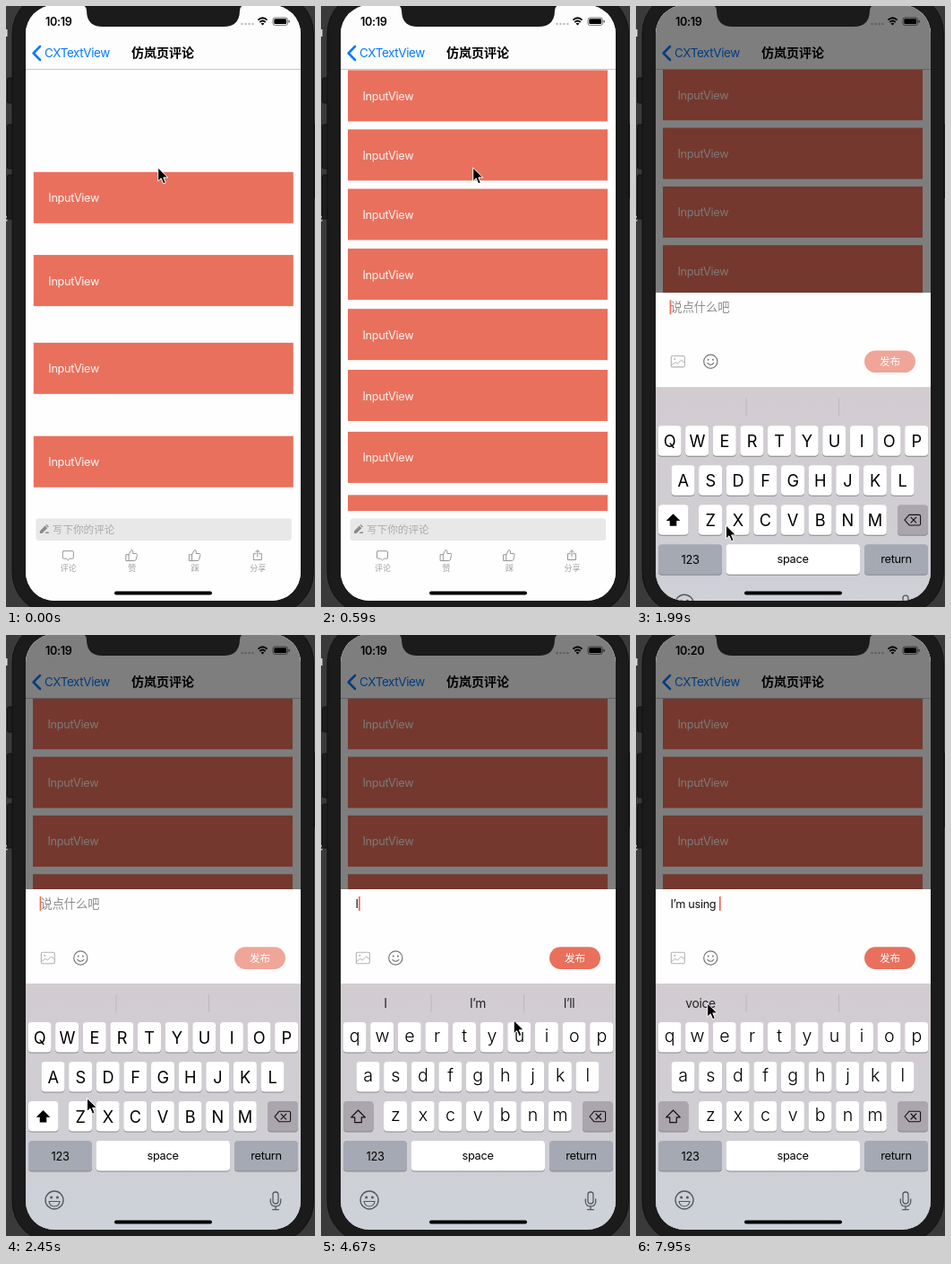
Animation of 345 by 669 pixels, one loop 8000 ms. Source, as an HTML page:

```html
<!DOCTYPE html>
<html lang="zh">
<head>
<meta charset="utf-8">
<style>
html, body { margin: 0; width: 100%; height: 100%; overflow: hidden; background: #3a3a3b; }
svg { display: block; }
text { font-family: Inter, "Noto Sans CJK SC", "Noto Sans CJK", sans-serif; letter-spacing: -.025em; white-space: pre; }
.cjk { letter-spacing: 0; }
.line { fill: none; stroke-linecap: round; stroke-linejoin: round; }
</style>
</head>
<body>
<svg id="stage" width="345" height="669" viewBox="0 0 345 669"></svg>
<script>
const CORAL = '#e9705c';
const ROWS = 8;

const rect = (x, y, w, h, fill, r = 0, extra = '') =>
  `<rect x="${x}" y="${y}" width="${w}" height="${h}" rx="${r}" fill="${fill}" ${extra}/>`;
const text = (x, y, size, fill, s, extra = '') =>
  `<text x="${x}" y="${y}" font-size="${size}" fill="${fill}" ${extra}>${s}</text>`;
const line = (d, stroke, width = 1, extra = '') =>
  `<path class="line" d="${d}" stroke="${stroke}" stroke-width="${width}" ${extra}/>`;
const at = (x, y, s) => `<g transform="translate(${x} ${y})">${s}</g>`;
const MID = 'text-anchor="middle"';
const CJK = 'class="cjk"';

function backdrop() {
  const sideKeys = [[80, 28], [132, 49], [188, 49]]
    .map(([y, h]) => rect(1.5, y, 9, h, '#1d1d1d', 2, 'stroke="#101010"')).join('');
  return rect(0, 0, 345, 669, '#3a3a3b') +
    rect(0, 26, 1.5, 8, '#ddd') + rect(0, 234, 1.5, 1.5, '#ccc') + rect(0, 238, 1.5, 1.5, '#ccc') +
    sideKeys + rect(340, 131, 5, 83, '#1d1d1d') +
    rect(7, -16, 336.5, 693, '#1b1b1b', 47, 'stroke="#111" stroke-width="1"');
}

function statusBar() {
  const dots = [264, 268, 272, 276]
    .map(x => `<circle cx="${x - .5}" cy="20" r="1.2" fill="#b9b9b9"/>`).join('');
  return text(44, 21.6, 12.6, '#000', '10:19', 'id="clock" font-weight="600"') + dots +
    line('M281.4 15.6Q286.5 11 291.6 15.6M283.3 18Q286.5 15.2 289.7 18', '#000', 1.9, 'style="stroke-linecap:butt"') +
    '<path d="M284.6 19.6Q286.5 18 288.4 19.6L286.5 21.6z"/>' +
    rect(298, 13, 16.5, 8.4, 'none', 2.4, 'stroke="#555" stroke-width=".8"') +
    rect(299.3, 14.3, 13.9, 5.8, '#000', 1.4) + rect(315.5, 15.8, 1.3, 2.8, '#555', .6);
}

function navBar() {
  return rect(22, -1, 307, 71.5, '#fdfdfd') + rect(22, 70, 307, .8, '#b9b9bb') + statusBar() +
    line('M38 45L30.6 52.5L38 60', '#007aff', 2.5) +
    text(43, 57.2, 13.4, '#007aff', 'CXTextView') +
    text(175, 57.4, 14, '#000', '仿岚页评论', `${CJK} ${MID} font-weight="600"`);
}

function bottomBar() {
  const thumb = 'M-6-.8h2.8v6.8h-2.8zM-3.2-.8L-.4-6q2.6 0 1.9 4h4q.9.5.5 2l-1.2 4.8q-.3 1.2-1.5 1.2h-6.5';
  const tabs = [
    [68.5, '评论', 'M-5-4.8h10q1 0 1 1v6.4q0 1-1 1h-3l-2 1.8-2-1.8h-3q-1 0-1-1v-6.4q0-1 1-1z'],
    [139.5, '赞', thumb], [210, '踩', thumb],
    [280, '分享', 'M-1.8-1.8h-2.7v6.8h9v-6.8h-2.7M0 1.5v-7M-2.2-3.5l2.2-2.2 2.2 2.2']
  ].map(([x, label, d]) => at(x, 611.5, line(d, '#969696')) +
    text(x + .5, 629, 9, '#a0a0a0', label, `${CJK} ${MID}`)).join('');
  return rect(20, 562, 312, 110, '#fefefe') + rect(32.5, 570.5, 285.5, 24.5, '#e8e8e8', 3) +
    '<path d="M37 587v-2.6l5.8-5.8 2.6 2.6-5.8 5.8zM43.5 577.9l.9-.9 2.6 2.6-.9.9zM42.5 587l1.5-1.5h3v1.5z" fill="#8b8b8b"/>' +
    text(51, 587, 11.6, '#aaa', '写下你的评论', CJK) + tabs;
}

function key(x, y, w, fill) {
  return rect(x, y + 1, w, 33.5, '#88868b', 4) + rect(x, y, w, 33.5, fill, 4);
}

function keyboard() {
  const rows = [['qwertyuiop', 37.5, 431], ['asdfghjkl', 52.5, 475], ['zxcvbnm', 83, 519]];
  let caps = '', upper = '', lower = '';
  for (const [letters, x0, y] of rows) {
    [...letters].forEach((c, i) => {
      const x = x0 + i * 30.63;
      caps += key(x - 13, y, 26, '#fff');
      upper += text(x, y + 23.6, 18.2, '#000', c.toUpperCase(), MID);
      lower += text(x, y + 21.6, 19.6, '#000', c, MID + ' font-weight="300"');
    });
  }
  const arrow = 'M41.5 529L49.3 536.8H45.3V542.6H37.7V536.8H33.7z';
  const dark = '#aba5ad', gray = '#a5a9b3';
  return rect(22, 388, 307, 420, 'url(#board)') +
    rect(122.6, 400, .9, 20, '#bbb5ba') + rect(226, 400, .9, 20, '#bbb5ba') +
    [72, 175, 277].map(x => text(x, 415, 13.8, '#222', '', `class="hint" ${MID}`)).join('') +
    caps + key(292, 519, 34, dark) +
    line('M300 536l5-5.8h11q1.6 0 1.6 1.6v8.4q0 1.6-1.6 1.6h-11zM307 533l5.8 6M312.8 533l-5.8 6', '#111', 1.1) +
    `<g id="upper">${upper}${key(25, 519, 33.5, '#fff')}<path d="${arrow}"/></g>` +
    `<g id="lower">${lower}${key(25, 519, 33.5, dark)}${line(arrow, '#111', 1.2)}</g>` +
    key(25, 563, 71, gray) + key(100.5, 563, 149.5, '#fff') + key(255, 563, 71, gray) +
    text(60.5, 585, 12.8, '#000', '123', MID) + text(175, 584, 12.8, '#000', 'space', MID) +
    text(290.5, 584, 12.8, '#000', 'return', MID) +
    at(54, 629, '<circle r="10" fill="none" stroke="#55595e" stroke-width="1.4"/>' +
      '<circle cx="-3.4" cy="-3" r="1.5" fill="#55595e"/><circle cx="3.4" cy="-3" r="1.5" fill="#55595e"/>' +
      line('M-6 1.5H6Q5 7 0 7T-6 1.5z', '#55595e', 1.2)) +
    at(301, 630, rect(-3, -10, 6, 13, 'none', 3, 'stroke="#55595e" stroke-width="1.3"') +
      line('M-5.7-2V1Q-5.2 6 0 6T5.7 1V-2M0 6V9.7M-3.3 9.7H3.3', '#55595e', 1.3));
}

function sheet() {
  return rect(22, 283, 307, 106, '#fefefe') +
    text(38.5, 303.6, 13.2, '#8a8a8a', '说点什么吧', `${CJK} id="holder"`) +
    text(38.5, 303.6, 12.7, '#111', '', 'id="typed"') +
    rect(38, 291, 1.8, 16, CORAL, .5, 'id="caret"') +
    rect(39.3, 353.3, 15, 12.4, 'none', 1.5, 'stroke="#b2b2b2" stroke-width="1.1"') +
    line('M39.8 363.5l4-3.2 2.6 1.8 4-4.2 3.6 2.8', '#b2b2b2') + '<circle cx="43.2" cy="356.8" r="1" fill="#b2b2b2"/>' +
    at(83.3, 359.5, '<circle r="7.6" fill="none" stroke="#777" stroke-width="1.2"/>' +
      '<circle cx="-2.6" cy="-2" r="1" fill="#777"/><circle cx="2.6" cy="-2" r="1" fill="#777"/>' +
      line('M-3.6 1.8Q0 5.8 3.6 1.8', '#777', 1.1)) +
    rect(255, 347.3, 57, 24.6, CORAL, 12.3, 'id="send"') +
    text(283.5, 363.8, 11.6, '#fff', '发布', `${CJK} ${MID}`) + keyboard();
}

const rowMarkup = `<g class="row">${rect(30, 0, 290, 57, CORAL)}${text(46.5, 33.6, 12.7, '#fff', 'InputView', 'opacity=".93"')}</g>`;

document.getElementById('stage').innerHTML = `
<defs>
  <clipPath id="screen">${rect(22, -1, 307, 663, '#000', 32)}</clipPath>
  <clipPath id="list">${rect(22, 70, 307, 492, '#000')}</clipPath>
  <linearGradient id="board" gradientUnits="userSpaceOnUse" x1="0" y1="388" x2="0" y2="662">
    <stop stop-color="#d2ccd1"/><stop offset=".55" stop-color="#d0ced3"/><stop offset="1" stop-color="#cdd2d9"/>
  </linearGradient>
</defs>
${backdrop()}
<g clip-path="url(#screen)">
  ${rect(22, -1, 307, 663, '#fefefe')}
  <g clip-path="url(#list)"><g id="rows">${rowMarkup.repeat(ROWS)}</g></g>
  <g id="bar">${bottomBar()}</g>
  ${navBar()}
  ${rect(22, -1, 307, 663, '#000', 0, 'id="dim"')}
  <g id="sheet">${sheet()}</g>
  ${rect(121, 651.5, 109, 4, '#000', 2)}
</g>
<path d="M82-2Q90-1 90 5Q90 23 108 23H243Q261 23 261 5Q261-1 269-2z" fill="#1b1b1b"/>
<path id="cursor" d="M0 0V15L3.5 11.8L6 17.8L8.6 16.6L6.1 10.9H11z" fill="#000" stroke="#fff" stroke-width="1"/>`;

const $ = id => document.getElementById(id);
const rowEls = document.querySelectorAll('.row');
const hintEls = document.querySelectorAll('.hint');

const OPEN = 1774;
// time, typed text, suggestions
const typing = [
  [1720, '', []],
  [4260, 'I', ['I', 'I’m', 'I’ll']],
  [5440, 'I’m ', []],
  [6500, 'I’m u', ['using', 'up', 'us']],
  [7440, 'I’m using ', ['voice']]
];
// time, x, y
const pointer = [
  [0, 169.7, 180], [880, 169.7, 180], [1390, 100.5, 578], [2250, 100.5, 578], [2570, 86, 487],
  [3380, 69.2, 447], [3520, 69.2, 447], [4150, 257, 447], [4330, 257, 447], [5020, 172, 410],
  [5600, 172, 410], [5960, 191.7, 419.5], [6200, 222, 455], [6600, 222, 455],
  [7250, 95, 438], [7440, 79.7, 410], [8000, 79.7, 410]
];

const clamp = v => Math.max(0, Math.min(1, v));
const spring = u => (1 + u) * Math.exp(-u);
const move = (el, x, y) => el.setAttribute('transform', `translate(${x} ${y})`);
const show = (el, on) => el.setAttribute('visibility', on ? 'inherit' : 'hidden');
const put = (el, s) => { if (el.textContent !== s) el.textContent = s; };

function draw(t) {
  const s = t / 1000;
  const shift = .8 * Math.exp(-s * 8);
  rowEls.forEach((el, i) => {
    const u = 3.19 + 9.1 * s - i * (.28 + .25 * s);
    move(el, 0, 70.2 + 65.35 * i + 669 * spring(u));
  });
  move($('rows'), shift, 0);
  move($('bar'), shift, 0);

  const opened = t > OPEN;
  $('dim').setAttribute('opacity', .5 * clamp((t - OPEN) / 200));
  show($('sheet'), opened);
  move($('sheet'), 0, 386 * spring(Math.max(0, t - OPEN) * .0183));

  const [since, typed, hints] = typing.filter(e => e[0] <= t).pop() || typing[0];
  put($('typed'), typed);
  hintEls.forEach((el, i) => put(el, hints[i] || ''));
  show($('holder'), !typed);
  show($('upper'), !typed);
  show($('lower'), typed);
  $('send').setAttribute('opacity', typed ? 1 : .62);
  $('caret').setAttribute('x', typed ? 38.8 + $('typed').getComputedTextLength() : 37.6);
  show($('caret'), (t - since) % 1000 < 780);
  put($('clock'), t < 6900 ? '10:19' : '10:20');

  const k = Math.max(1, pointer.findIndex(p => p[0] > t));
  const [t0, x0, y0] = pointer[k - 1], [t1, x1, y1] = pointer[k];
  const p = clamp((t - t0) / (t1 - t0)), e = p * p * (3 - 2 * p);
  move($('cursor'), x0 + (x1 - x0) * e, y0 + (y1 - y0) * e);
}

const start = performance.now();
(function tick() {
  draw((performance.now() - start) % 8000);
  requestAnimationFrame(tick);
})();
</script>
</body>
</html>
```
